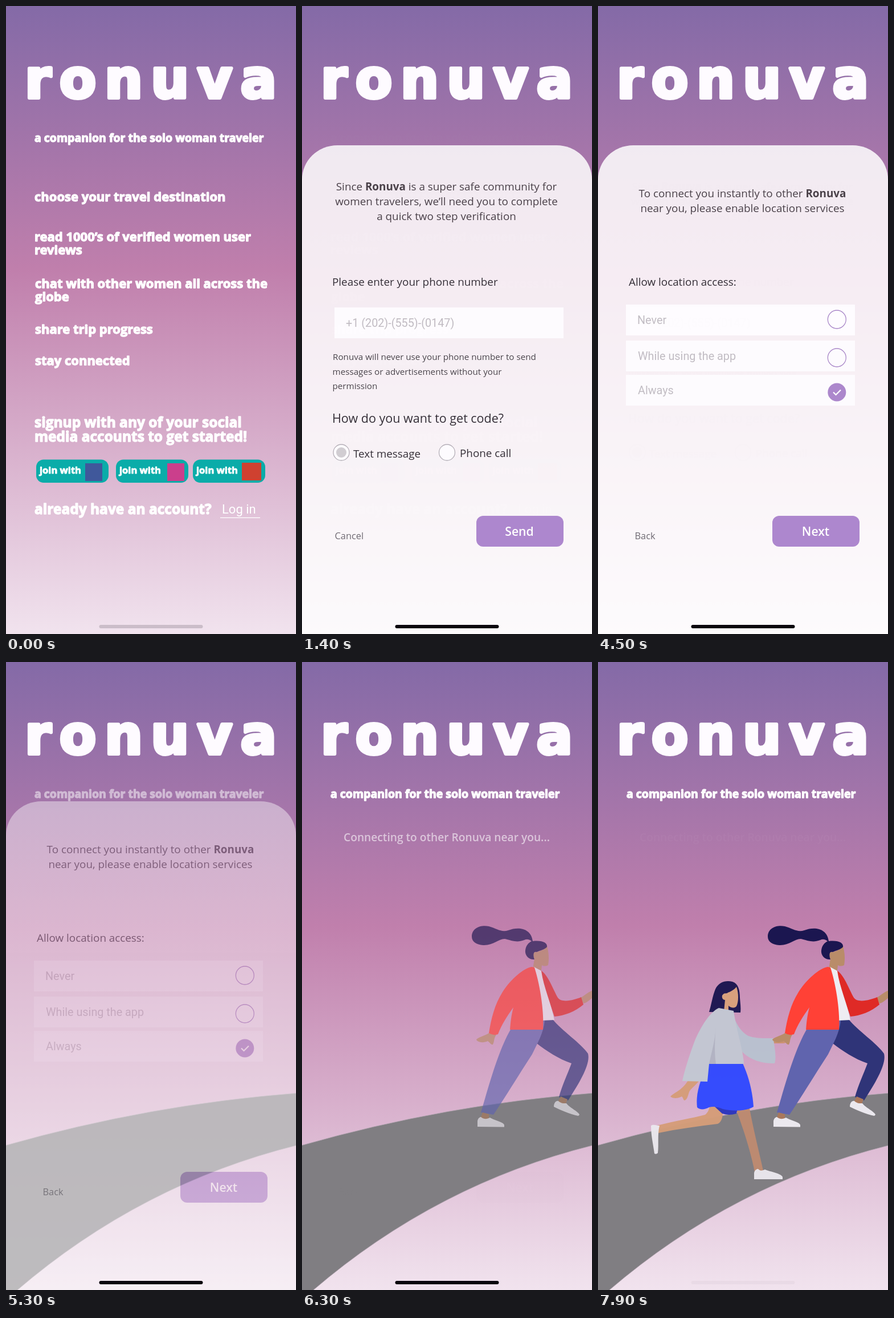
An HTML page that plays this animation: 509x1100 px, repeating every 8000 ms.

```html
<!DOCTYPE html>
<html lang="en">
<head>
<meta charset="utf-8">
<title>Ronuva</title>
<style>
  html, body { margin: 0; width: 100%; height: 100%; overflow: hidden; background: #fff; }
  svg { display: block; width: 100%; height: 100%; }
  text { font-family: "Open Sans", "Noto Sans", sans-serif; font-size: 18.85px; fill: #342f37; white-space: pre; }
  .mid { text-anchor: middle; fill: #4a4149; }
  .bold { font-weight: 700; }
  .small { font-size: 15.2px; fill: #4a454c; }
  .ask { font-size: 21.5px; }
  .quiet { font-size: 16.4px; fill: #6f6a73; }
  .cta { font-size: 21.2px; font-weight: 600; fill: #fff; text-anchor: middle; }
  .field { font-family: Roboto, Arial, sans-serif; font-size: 19.8px; fill: #c1bcc3; }
  .login { font-family: Roboto, Arial, sans-serif; font-size: 22px; fill: #fff; }
  .show text { font-weight: 700; font-size: 22px; fill: #fff; stroke: #fff; stroke-width: 1.3; stroke-linejoin: round; }
  .show .tag { font-size: 19.5px; }
  .show .big { font-size: 24.5px; }
  .show .join { font-size: 16.6px; stroke-width: .9; }
  .brand { font-family: "DejaVu Sans", Verdana, sans-serif; font-weight: 700; font-size: 94px; letter-spacing: 14.5px;
    fill: #fefbff; stroke: #fefbff; stroke-width: 6; stroke-linejoin: round; }
  .ring { fill: #fefcff; stroke: #a987c8; stroke-width: 1.3; }
  .radio { fill: #fefcff; stroke: #b5b0b8; stroke-width: 1.3; }
  .box { fill: #fefcff; }
  .status { font-weight: 600; font-size: 19.2px; text-anchor: middle; fill: #fff; fill-opacity: .87; }
</style>
</head>
<body>
<svg viewBox="0 0 509 1100" preserveAspectRatio="none">
  <defs>
    <linearGradient id="sky" x1="0" y1="0" x2="0" y2="1">
      <stop offset="0" stop-color="#846aa7"/>
      <stop offset=".42" stop-color="#c07fac"/>
      <stop offset="1" stop-color="#f1e3ee"/>
    </linearGradient>
    <rect id="bg" width="509" height="1100" fill="url(#sky)"/>
    <g id="sheet">
      <use href="#bg"/>
      <path d="M0 1100V304A62 60 0 0 1 62 244H447A62 60 0 0 1 509 304V1100Z" fill="#fff" opacity=".85"/>
      <rect x="306" y="893" width="153" height="54" rx="12" fill="#ad87ce"/>
    </g>
    <g id="tagline" class="show">
      <text class="tag" x="50" y="238">a companion for the solo woman traveler</text>
    </g>
  </defs>

  <g id="signup">
    <use href="#bg"/>
    <use href="#tagline"/>
    <g class="show">
      <text x="50" y="342">choose your travel destination</text>
      <text x="50" y="412">read 1000’s of verified women user</text>
      <text x="50" y="435">reviews</text>
      <text x="51" y="494">chat with other women all across the</text>
      <text x="51" y="517">globe</text>
      <text x="51" y="574">share trip progress</text>
      <text x="51" y="629">stay connected</text>
      <text class="big" x="50" y="738">signup with any of your social</text>
      <text class="big" x="50" y="763">media accounts to get started!</text>
      <text class="big" x="50" y="890">already have an account?</text>
      <g fill="#0aaca9">
        <rect x="53" y="794.500" width="127" height="40.500" rx="13"/>
        <rect x="193" y="794.500" width="127" height="40.500" rx="13"/>
        <rect x="328" y="794.500" width="127" height="40.500" rx="13"/>
      </g>
      <text class="join" x="59" y="819">join with</text>
      <text class="join" x="199" y="819">join with</text>
      <text class="join" x="334" y="819">join with</text>
      <rect x="139" y="801" width="30" height="31" fill="#40589b"/>
      <rect x="283" y="801" width="30" height="31" fill="#cb3f8c"/>
      <rect x="414" y="800" width="34" height="31" fill="#cf4130"/>
    </g>
    <text class="login" x="379" y="889">Log in</text>
    <path d="M376 896.3H446" stroke="#fff" stroke-width="1.3"/>
  </g>

  <g id="phone">
    <use href="#sheet"/>
    <text class="mid" x="253.5" y="323">Since <tspan class="bold">Ronuva</tspan> is a super safe community for</text>
    <text class="mid" x="253.5" y="349">women travelers, we’ll need you to complete</text>
    <text class="mid" x="253.5" y="375">a quick two step verification</text>
    <text x="53" y="490">Please enter your phone number</text>
    <rect class="box" x="57" y="528" width="402" height="54"/>
    <text class="field" x="77" y="562">+1 (202)-(555)-(0147)</text>
    <text class="small" x="54" y="620">Ronuva will never use your phone number to send</text>
    <text class="small" x="53.5" y="646">messages or advertisements without your</text>
    <text class="small" x="53.5" y="671">permission</text>
    <text class="ask" x="53" y="730">How do you want to get code?</text>
    <circle class="radio" cx="69" cy="782" r="14"/>
    <circle cx="69" cy="782" r="9" fill="#d1ced3"/>
    <circle class="radio" cx="254.500" cy="782" r="14"/>
    <text x="90" y="791">Text message</text>
    <text x="277" y="790">Phone call</text>
    <text class="cta" x="381.5" y="928">Send</text>
    <text class="quiet" x="57.5" y="934">Cancel</text>
  </g>

  <g id="place">
    <use href="#sheet"/>
    <text class="mid" x="253.5" y="335">To connect you instantly to other <tspan class="bold">Ronuva</tspan></text>
    <text class="mid" x="253.5" y="361">near you, please enable location services</text>
    <text x="54" y="490">Allow location access:</text>
    <rect class="box" x="49" y="523" width="402" height="54"/>
    <rect class="box" x="49" y="586" width="402" height="54"/>
    <rect class="box" x="49" y="646" width="402" height="54"/>
    <text class="field" x="69" y="557">Never</text>
    <text class="field" x="70" y="620">While using the app</text>
    <text class="field" x="70" y="680">Always</text>
    <circle class="ring" cx="419.300" cy="549" r="16"/>
    <circle class="ring" cx="419.300" cy="616" r="16"/>
    <circle cx="419.300" cy="676.500" r="16" fill="#ac87cc"/>
    <path d="M413 676.500l4.500 4.500 8.500-8.500" fill="none" stroke="#fff" stroke-width="2.200"/>
    <text class="cta" x="382" y="928">Next</text>
    <text class="quiet" x="64.5" y="934">Back</text>
  </g>

  <g id="road">
    <use href="#bg"/>
    <use href="#tagline"/>
    <path d="M-2 847Q251 775 511 755V846.500Q237 914.500 20 1100L17 1103H-2Z" fill="#807e82" stroke="#b3a5b2" stroke-width=".8"/>
  </g>

  <text id="status" class="status" x="254" y="314">Connecting to other Ronuva near you...</text>

  <g id="friend">
    <g fill="#d59d79">
      <path d="M196 778L219 781C220 793 218 806 210 809C175 813 140 818 106 825L103 812C135 804 165 799 188 793C193 789 195 784 196 778Z"/>
      <path d="M158 733H178C170 743 163 747 160 753C158 759 157 766 152 768C149 767 150 763 147 761C140 765 131 765 127 761C134 754 148 750 158 733Z"/>
    </g>
    <path d="M242 783L266 782C272 815 282 855 290 891L275 893C268 858 256 820 242 783Z" fill="#be8b71"/>
    <g fill="#ebe8ee">
      <path d="M93 812C98 809 103 812 108 812C104 828 107 846 105 860Q102 863 99 861C97 845 93 830 93 812Z"/>
      <path d="M274 906V895C275 890 278 888 281 888C286 893 290 890 293 889C303 893 322 896 324 902V906Z"/>
    </g>
    <path d="M205 779L245 782L243 791Q230 795 218 791Z" fill="#2a35bd"/>
    <path d="M194 703H254C264 725 271 750 273 779C262 786 240 788 219 783C210 779 202 778 195 780C186 785 178 784 174 780C171 755 180 730 194 703Z" fill="#3049ff"/>
    <path d="M195 613C199 600 201 585 206 573C212 560 225 557 236 560C246 563 249 574 249 588C250 600 251 606 250 614Z" fill="#1b1650"/>
    <path d="M218 584C222 578 226 582 228 579C234 577 240 573 243 569C247 580 247 595 243 603C239 607 233 606 229 602V612H221L223 592C219 592 217 588 218 584Z" fill="#d9a17c"/>
    <path d="M307 661L321 656C328 652 334 651 337 655C338 662 330 669 323 668L308 668Z" fill="#cb9270"/>
    <path d="M236 613C240 630 250 648 264 655C278 660 296 659 308 659C309 674 314 690 310 703C284 704 256 694 242 668Z" fill="#b9c2d0"/>
    <path d="M212 606C196 613 180 640 170 663C160 690 152 715 148 734L192 735L195 704H256C255 680 243 645 238 611Z" fill="#c3c8d3"/>
    <path d="M207 640C205 665 199 685 195 704H207C204 685 205 660 207 640Z" fill="#b2b4c3"/>
  </g>

  <g id="leader">
    <path d="M424 627L440 626C455 645 490 668 502 686C507 705 485 740 467 768L451 762C457 740 466 722 473 703C450 695 430 682 412 668Z" fill="#2f3478"/>
    <path d="M367 642L426 628C424 650 413 668 404 687C380 724 355 765 336 793L314 789C330 735 345 680 367 642Z" fill="#6064ae"/>
    <g fill="#a9785c">
      <path d="M317 789L328 792L328 803L313 801Z"/>
      <path d="M454 761L466 766L462 776L449 771Z"/>
    </g>
    <g fill="#ebe8ee">
      <path d="M308 814V804C309 799 312 797 314 797C320 802 326 800 330 798C338 803 354 806 355 811V814.500Z"/>
      <path d="M442 779C442 772 446 768 450 769C456 774 460 773 464 773C470 781 486 788 487 793L485 795C470 792 452 784 442 779Z"/>
    </g>
    <g fill="#b98c69">
      <path d="M489 588C496 584 502 578 510 575V588C504 592 500 597 494 598Z"/>
      <path d="M328 650C322 654 312 656 306 661C307 666 318 668 326 664C330 667 332 671 335 670C338 665 336 660 341 653Z"/>
      <path d="M412 508C420 506 428 502 430 497C433 508 434 520 432 531C428 533 424 533 421 531L420 540L405 538L408 520C403 512 408 505 413 509Z"/>
    </g>
    <path d="M298 481C298 465 315 460 328 463C342 467 350 474 362 470C380 463 402 466 405 489C424 487 431 493 430 499C426 504 418 505 412 508C406 506 405 513 408 521C398 522 391 514 392 505C393 497 397 492 403 489C398 485 394 485 390 487C378 492 368 488 360 486C348 481 338 497 318 496C306 495 298 490 298 481Z" fill="#1b1650"/>
    <path d="M419 540C432 548 440 572 449 588C456 598 478 592 490 587L494 600C480 612 460 620 443 621C436 600 424 570 419 540Z" fill="#df2a26"/>
    <path d="M407 534L420 541C424 570 438 600 443 627L422 628Z" fill="#eeedf2"/>
    <path d="M403 534C388 537 366 556 352 578C338 600 332 625 328 650Q336 655 344 652C350 636 360 620 371 605C367 620 366 632 365 644H423C425 615 419 570 408 535Z" fill="#ff4136"/>
  </g>

  <text class="brand" x="33" y="160.700">ronuva</text>
  <rect id="bar" x="163.500" y="1084" width="182" height="6" rx="3" fill="#0a060d"/>
</svg>
<script>
  const LOOP = 8000, STEP = 100;
  // start time, share done at the first step, decay in ms
  const FADES = {
    phone: [100, .2, 280],
    place: [3700, .5, 160],
    road: [5300, .5, 186],
    leader: [6200, .45, 210],
    friend: [7000, .4, 310]
  };
  const $ = id => document.getElementById(id);
  const show = (id, v) => $(id).setAttribute('opacity', v.toFixed(3));

  function fade(name, t) {
    const [start, first, decay] = FADES[name];
    return t < start ? 0 : 1 - (1 - first) * Math.exp((start - t) / decay);
  }

  function draw(t) {
    for (const name in FADES) show(name, fade(name, t));
    const leave = 1 - fade('friend', t);
    show('status', fade('leader', t) * leave);
    show('bar', (.16 + .84 * fade('phone', t)) * leave);
  }

  const begin = performance.now();
  function tick() {
    const t = (performance.now() - begin) % LOOP;
    draw(Math.floor(t / STEP) * STEP);
    requestAnimationFrame(tick);
  }
  draw(0);
  requestAnimationFrame(tick);
</script>
</body>
</html>
```
